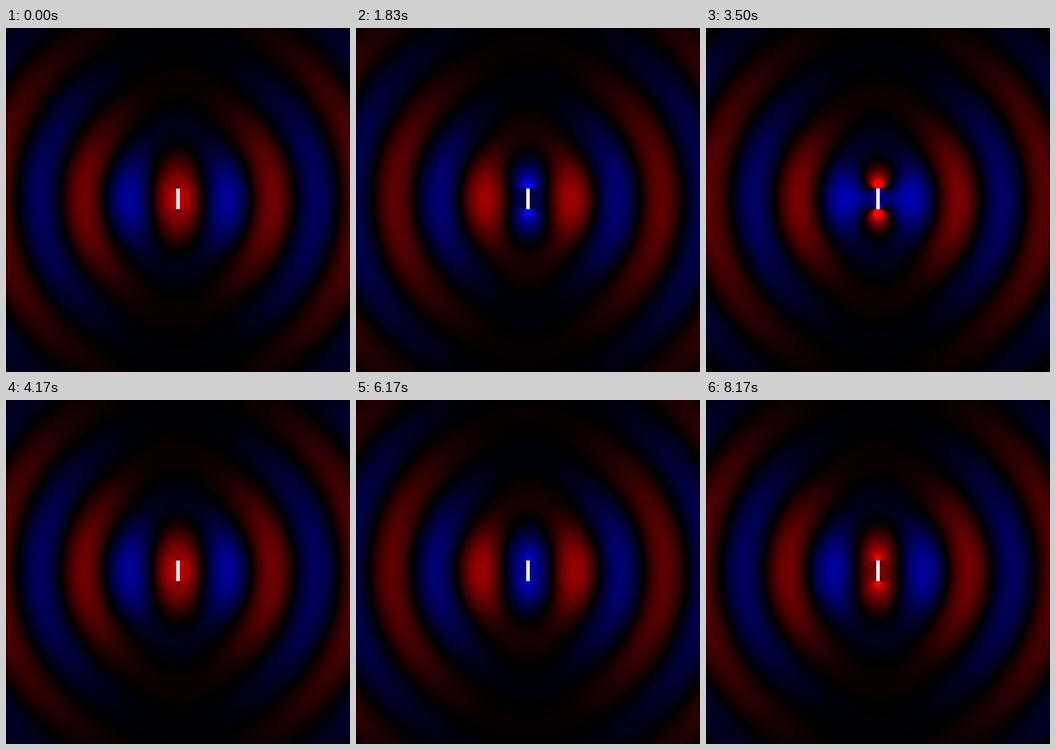
Write an HTML page with a canvas that moves like this. It is 600 by 600 pixels and loops after 8.34 s.

```html
<!DOCTYPE html>
<html lang="en">
<head>
<meta charset="utf-8">
<title>Dipole radiation</title>
<style>
  html, body { margin: 0; width: 100%; height: 100%; overflow: hidden; background: #000; }
  canvas { display: block; width: 600px; height: 600px; }
</style>
</head>
<body>
<canvas id="stage" width="600" height="600"></canvas>
<script>
const SIZE = 600, CX = 300, CY = 298;
const HALF = 18;                  // half length of the antenna
const K = 2 * Math.PI / 150;      // wave number per pixel
const GAIN = 370;
const LOOP = 8340, STEPS = 50, CYCLE = 25;
const PHASE = 3 * Math.PI / 180;

const ctx = document.getElementById('stage').getContext('2d');
const image = ctx.createImageData(SIZE, SIZE);
const pixels = new Uint32Array(image.data.buffer);

// Bessel functions J0, Y0 and their derivatives, by power series
function bessel(x) {
  const q = x * x / 4, log = Math.log(x / 2) + 0.5772156649015329;
  let term = 1, h = 0, j = 1, dj = 0, s = 0, ds = 0;
  for (let m = 1; m < 60; m++) {
    term *= -q / (m * m);
    h += 1 / m;
    const slope = term * 2 * m / x;
    j += term;
    dj += slope;
    s += h * term;
    ds += h * slope;
  }
  const c = 2 / Math.PI;
  return [j, c * (log * j - s), dj, c * (j / x + log * dj - ds)];
}

// Lookup by distance in pixels
const FINE = 10, COUNT = 450 * FINE;
const [J0, Y0, DJ, DY] = [0, 1, 2, 3].map(() => new Float64Array(COUNT));
for (let i = 0; i < COUNT; i++) {
  [J0[i], Y0[i], DJ[i], DY[i]] = bessel(K * Math.max(i, 1) / FINE);
}

function look(table, r) {
  const p = r * FINE, i = p | 0;
  return table[i] + (table[i + 1] - table[i]) * (p - i);
}

// Axial electric field of a short uniform line current, in two phases
const W = 300, H = 302, SAMPLES = 9;
const inPhase = new Float32Array(W * H), quadrature = new Float32Array(W * H);
for (let j = 0; j < H; j++) {
  for (let i = 0; i < W; i++) {
    const x = i + 0.5, z = j + 0.5;
    let a = 0, b = 0;
    for (let n = 0; n < SAMPLES; n++) {
      const r = Math.hypot(x, z + HALF * ((2 * n + 1) / SAMPLES - 1));
      a += look(J0, r) / SAMPLES;
      b += look(Y0, r) / SAMPLES;
    }
    for (const side of [1, -1]) {
      const d = z + side * HALF, r = Math.hypot(x, d);
      const weight = side * d / (r * 2 * HALF * K);
      a += weight * look(DJ, r);
      b += weight * look(DY, r);
    }
    inPhase[j * W + i] = a * GAIN;
    quadrature[j * W + i] = b * GAIN;
  }
}

function draw(step) {
  const phi = 2 * Math.PI * step / CYCLE + PHASE;
  const c = Math.cos(phi), s = Math.sin(phi);
  for (let j = 0; j < H; j++) {
    const up = (CY - 1 - j) * SIZE, down = (CY + j) * SIZE;
    for (let i = 0; i < W; i++) {
      const p = j * W + i;
      const v = inPhase[p] * c + quadrature[p] * s;
      const level = Math.min(255, Math.round(Math.abs(v)));
      const color = (0xff000000 | (v > 0 ? level : level << 16)) >>> 0;
      const left = CX - 1 - i, right = CX + i;
      if (j < CY) pixels[up + left] = pixels[up + right] = color;
      pixels[down + left] = pixels[down + right] = color;
    }
  }
  ctx.putImageData(image, 0, 0);
  ctx.fillStyle = '#fff';
  ctx.fillRect(CX - 3, CY - HALF, 6, 2 * HALF);
}

// Three steps per half second: 170, 160 and 170 ms
function stepAt(t) {
  const rest = t % 500;
  const n = Math.floor(t / 500) * 3 + (rest >= 170) + (rest >= 330);
  return Math.min(n, STEPS - 1);
}

let shown = -1;
const start = performance.now();
function tick() {
  const step = stepAt((performance.now() - start) % LOOP);
  if (step !== shown) draw(shown = step);
  requestAnimationFrame(tick);
}
tick();
</script>
</body>
</html>
```
